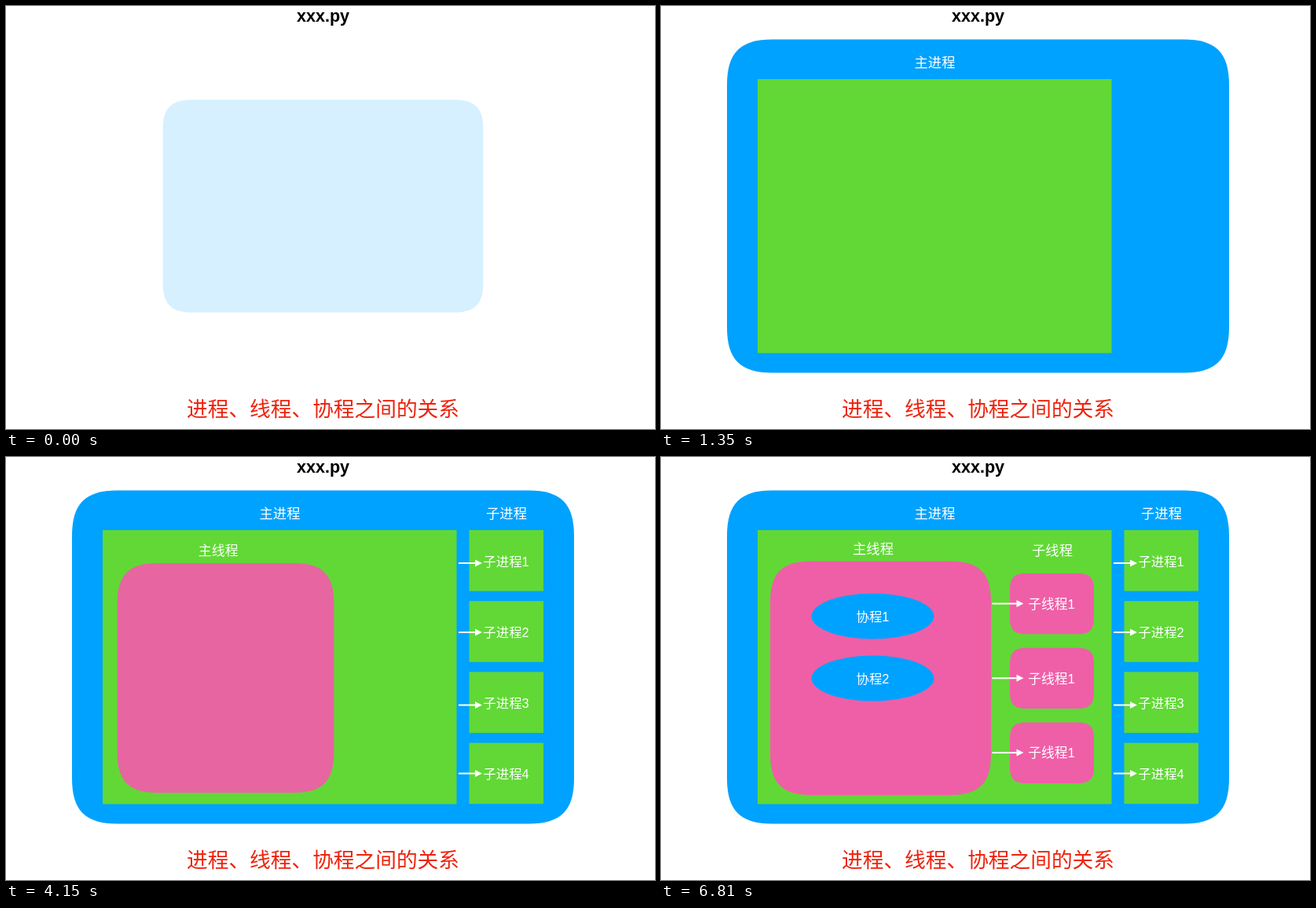
Write an HTML page with a canvas that moves like this. It is 826 by 538 pixels and loops after 8470 ms.

```html
<!DOCTYPE html>
<html lang="zh-CN">
<head>
<meta charset="utf-8">
<style>
html, body { margin: 0; width: 100%; height: 100%; overflow: hidden; background: #fff; }
canvas { display: block; }
</style>
</head>
<body>
<canvas id="stage" width="826" height="538"></canvas>
<script>
const W = 826, H = 538, LOOP = 8470, STEP = 148;
const BLUE = '#00a2ff', GREEN = '#61d836', PINK = '#ef5fa7', RED = '#ee220c', WHITE = '#fff';
const FONT = '"Liberation Sans", "Noto Sans CJK SC", "Noto Sans CJK", sans-serif';

const stage = document.getElementById('stage').getContext('2d');
const layer = document.createElement('canvas');
layer.width = W;
layer.height = H;
const c = layer.getContext('2d');

const clamp = v => Math.min(1, Math.max(0, v));
const wave = (a, b, p) => a + (b - a) * (1 - Math.cos(Math.PI * clamp(p))) / 2;

function text(ctx, str, x, y, size, color = WHITE, weight = 500) {
  ctx.font = `${weight} ${size}px ${FONT}`;
  ctx.fillStyle = color;
  ctx.textAlign = 'center';
  ctx.fillText(str, x, y + size * 0.38);
}

function rect(x, y, w, h) {
  c.fillStyle = GREEN;
  c.fillRect(x, y, w, h);
}

// Rounded box with continuous corners; e is the length of a corner along each side.
function squircle(x, y, w, h, e, color) {
  const k = e * 0.29, r = x + w, b = y + h;
  c.fillStyle = color;
  c.beginPath();
  c.moveTo(x + e, y);
  c.lineTo(r - e, y);
  c.bezierCurveTo(r - k, y, r, y + k, r, y + e);
  c.lineTo(r, b - e);
  c.bezierCurveTo(r, b - k, r - k, b, r - e, b);
  c.lineTo(x + e, b);
  c.bezierCurveTo(x + k, b, x, b - k, x, b - e);
  c.lineTo(x, y + e);
  c.bezierCurveTo(x, y + k, x + k, y, x + e, y);
  c.fill();
}

function arrow(x1, x2, y) {
  c.fillStyle = WHITE;
  c.fillRect(x1, y - 1, x2 - x1 - 8, 2);
  c.beginPath();
  c.moveTo(x2, y);
  c.lineTo(x2 - 9, y - 4.5);
  c.lineTo(x2 - 9, y + 4.5);
  c.fill();
}

function compose(draw, alpha) {
  if (alpha <= 0) return;
  c.save();
  c.clearRect(0, 0, W, H);
  draw();
  c.restore();
  stage.globalAlpha = Math.min(1, alpha);
  stage.drawImage(layer, 0, 0);
  stage.globalAlpha = 1;
}

// Fade in while springing past full size and back.
function pop(ms, cx, cy, peak, draw) {
  const u = ms / 560;
  const scale = u < 0.38 ? peak * Math.sin(u / 0.38 * Math.PI / 2)
    : u < 0.7 ? wave(peak, 0.955, (u - 0.38) / 0.32)
    : wave(0.955, 1, (u - 0.7) / 0.45);
  compose(() => {
    c.translate(cx, cy);
    c.scale(scale, scale);
    c.translate(-cx, -cy);
    draw();
  }, u);
}

// Reveal from left to right behind a soft edge.
function wipe(ms, left, speed, soft, draw) {
  if (ms <= 0) return;
  const front = left + ms * speed;
  compose(() => {
    draw();
    const mask = c.createLinearGradient(front - soft, 0, front, 0);
    mask.addColorStop(0, '#000');
    mask.addColorStop(1, 'transparent');
    c.globalCompositeOperation = 'destination-in';
    c.fillStyle = mask;
    c.fillRect(0, 0, W, H);
  }, 1);
}

function mainProcess() {
  rect(123, 93, 450.5, 348.5);
  text(c, '主进程', 348.5, 71, 17.3);
}

function childProcesses() {
  text(c, '子进程', 637, 71, 17.3);
  [135, 223, 315.5, 402.5].forEach((y, i) => {
    const top = 93 + i * 90.2;
    rect(589.5, top, 94.5, 77.5);
    text(c, '子进程' + (i + 1), 636.5, top + 39.3, 16.4);
    arrow(576, 606, y);
  });
}

function mainThread() {
  squircle(139, 132.5, 281, 297.5, 52, PINK);
  text(c, '主线程', 270, 116, 17.3);
}

function childThreads() {
  text(c, '子线程', 498, 118, 17.3);
  for (let i = 0; i < 3; i++) {
    const top = 148 + i * 94.8;
    squircle(444, top, 107, 77.3, 20, PINK);
    text(c, '子线程1', 497, top + 38.5, 16.8);
    arrow(421.5, 461.5, top + 38.5);
  }
}

function coroutine(label, y) {
  c.fillStyle = BLUE;
  c.beginPath();
  c.ellipse(269.5, y, 78, 29, 0, 0, Math.PI * 2);
  c.fill();
  text(c, label, 269.5, y, 16.4);
}

function render(t) {
  stage.fillStyle = WHITE;
  stage.fillRect(0, 0, W, H);
  text(stage, 'xxx.py', 403.5, 11.5, 21.6, '#000', 700);
  text(stage, '进程、线程、协程之间的关系', 403.5, 512.3, 26.7, RED);

  pop(t + 88, 403.5, 254.5, 1.055, () => squircle(84, 42.5, 639, 424, 58, BLUE));
  compose(mainProcess, (t - 652) / 560);
  wipe(t - 1400, 575, 0.108, 12, childProcesses);
  pop(t - 3612, 279.5, 268, 1.075, mainThread);
  wipe(t - 4293, 421, 0.15, 14, childThreads);
  pop(t - 5350, 269.5, 202.5, 1.055, () => coroutine('协程1', 202.5));
  pop(t - 6100, 269.5, 281.5, 1.055, () => coroutine('协程2', 281.5));
}

const start = performance.now();
function tick() {
  const t = (performance.now() - start) % LOOP;
  render(Math.floor(t / STEP) * STEP);
  requestAnimationFrame(tick);
}
tick();
</script>
</body>
</html>
```
